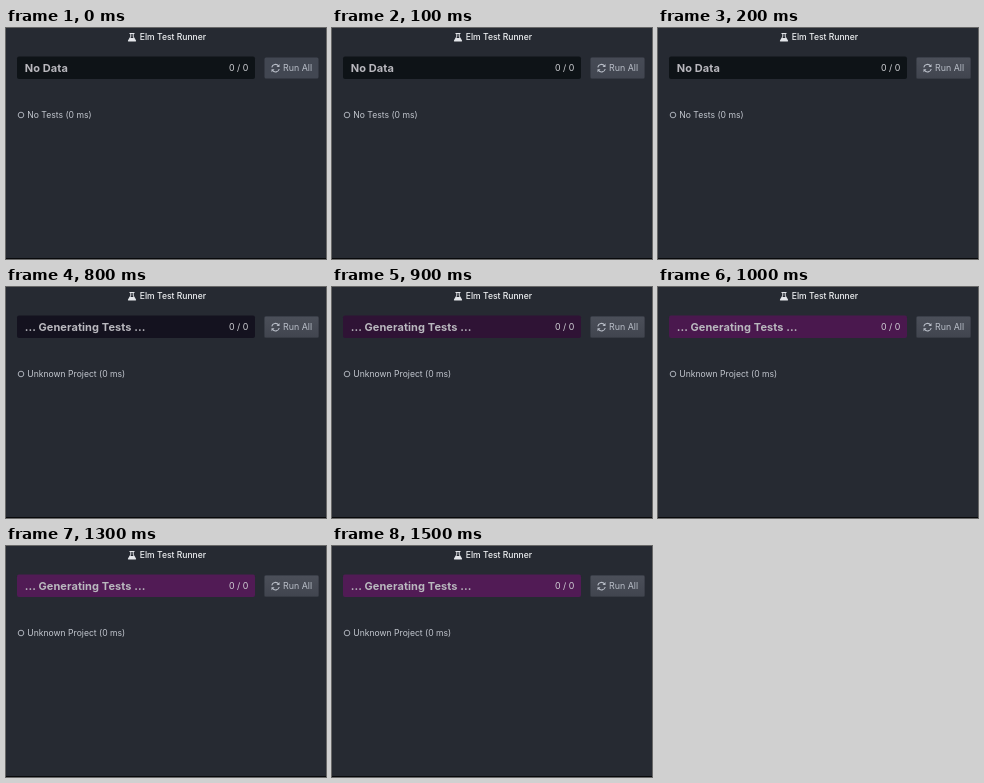
An HTML page that plays this animation: 320 by 231 pixels, repeating every 8000 ms.

```html
<!DOCTYPE html>
<html lang="en">
<head>
<meta charset="utf-8">
<title>Test runner panel</title>
<style>
  html, body { margin: 0; width: 100%; height: 100%; overflow: hidden; background: #262a32; }
  svg { display: block; width: 100vw; height: 100vh; }
  text { font-family: Inter, "Open Sans", sans-serif; font-size: 8.6px; fill: #c3c7cf; }
  .title { font-size: 8.55px; font-weight: 500; fill: #f0f2f4; }
  .head { font-size: 11px; font-weight: 700; letter-spacing: .1px; fill: #b9b8be; }
  .count { font-size: 8.8px; fill: #d3d4d8; }
  .run { font-size: 8.9px; fill: #b9bec8; }
  .icon { fill: none; stroke: #b9bec8; stroke-width: 1.1; }

  .bar, .raised, .idle, .busy { animation: 8s step-end infinite; }
  .bar { animation-name: bar; }
  .raised { animation-name: raise; }
  .idle { animation-name: idle; }
  .busy { animation-name: busy; }

  /* 1.25% is 100 ms */
  @keyframes bar {
    0% { fill: #0e1317; }
    10% { fill: #14121f; }
    11.25% { fill: #2f1335; }
    12.5% { fill: #4a184e; }
    13.75%, 100% { fill: #511b55; }
  }
  @keyframes raise {
    0% { opacity: 0; }
    1.25% { opacity: .5; }
    2.5%, 100% { opacity: 1; }
  }
  @keyframes idle {
    0% { visibility: visible; }
    10%, 100% { visibility: hidden; }
  }
  @keyframes busy {
    0% { visibility: hidden; }
    10%, 100% { visibility: visible; }
  }
</style>
</head>
<body>
<svg viewBox="0 0 320 231" preserveAspectRatio="none">
  <linearGradient id="shade" x2="0" y2="1">
    <stop stop-color="#4b4f59"/>
    <stop offset="1" stop-color="#41454f"/>
  </linearGradient>

  <rect width="320" height="231" fill="#262a32"/>
  <rect y="230" width="320" height="1" fill="#08090b"/>

  <path d="M123.5 5h5v1h-.8v2.4l2.3 4q.5 1.1-.6 1.1h-6.800q-1.100 0-.6-1.100l2.300-4v-2.400h-.8z" fill="#e4e6ea"/>
  <path d="M125.300 6h1.400v2.600l.9 1.500h-3.200l.9-1.500z" fill="#262a32"/>
  <text class="title" x="133.800" y="12.300">Elm Test Runner</text>

  <rect class="bar" x="11" y="28.500" width="238" height="22.500" rx="2"/>
  <text class="head idle" x="18.700" y="44">No Data</text>
  <text class="head busy" x="18.700" y="44">... Generating Tests ...</text>
  <text class="count" x="242.200" y="42.500" text-anchor="end">0 / 0</text>

  <rect x="258.500" y="29.500" width="54" height="21" rx="1.500" fill="#424752"/>
  <rect class="raised" x="258.300" y="29.300" width="54.500" height="21.500" rx="1.500" fill="url(#shade)" stroke="#2c3038" stroke-width=".5"/>
  <path class="icon" d="M265.800 39.300a3.700 3.700 0 0 1 6.700-1.300M273.200 41a3.700 3.700 0 0 1-6.700 1.300"/>
  <path d="M273.500 36v3h-3zM265.500 44.300v-3h3z" fill="#b9bec8"/>
  <text class="run" x="277" y="43.200">Run All</text>

  <circle cx="15" cy="87" r="2.800" fill="none" stroke="#b8bdc6" stroke-width=".9"/>
  <text class="idle" x="21.300" y="90">No Tests (0 ms)</text>
  <text class="busy" x="21.300" y="90">Unknown Project (0 ms)</text>
</svg>
</body>
</html>
```
